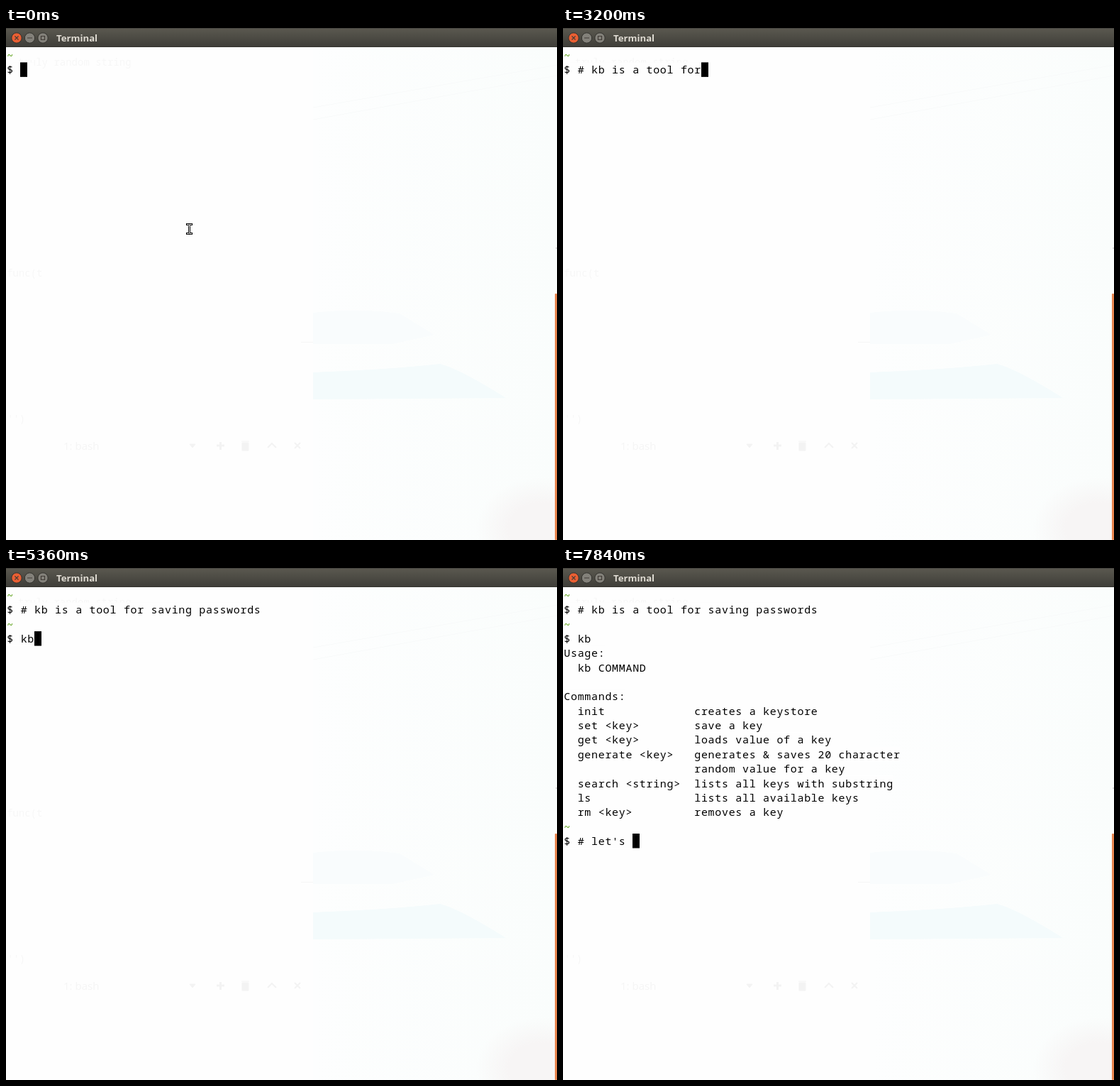
Recreate the animation shown at these times as an HTML page. Size 777 px wide and 721 px high, loop 8 s.

```html
<!DOCTYPE html>
<html lang="en">
<head>
<meta charset="utf-8">
<title>Terminal</title>
<style>
html, body { margin: 0; width: 100%; height: 100%; overflow: hidden; background: #fefefe; }
svg { display: block; width: 777px; height: 721px; }
text { white-space: pre; }
.term { font: 15px "Noto Sans Mono", "DejaVu Sans Mono", monospace; letter-spacing: .68px; }
.title { font: 700 13.2px "Open Sans", "Noto Sans", sans-serif; fill: #dfdbd2; }
.ghost { font: 14px "Noto Sans Mono", monospace; fill: #f7f7f7; }
.tab { font: 15px "Open Sans", sans-serif; fill: #f5f5f5; }
</style>
</head>
<body>
<svg viewBox="0 0 777 721">
  <defs>
    <linearGradient id="bar" x2="0" y2="1">
      <stop offset="0" stop-color="#5b5950"/>
      <stop offset="1" stop-color="#3e3d38"/>
    </linearGradient>
    <linearGradient id="sky" x2="1" y2="0">
      <stop offset="0" stop-color="#fdfefe"/>
      <stop offset="1" stop-color="#fafdfc"/>
    </linearGradient>
    <radialGradient id="rock">
      <stop offset=".5" stop-color="#f7f5f5"/>
      <stop offset="1" stop-color="#f7f5f5" stop-opacity="0"/>
    </radialGradient>
  </defs>

  <!-- faint desktop behind the window -->
  <rect width="777" height="721" fill="#fefefe"/>
  <rect x="433" y="27" width="344" height="694" fill="url(#sky)"/>
  <path d="M433 112 777 52M433 129 777 67" stroke="#f8fafa" fill="none"/>
  <path d="M433 401Q500 394 555 402L604 432 545 445H433Z" fill="#f9fcfd"/>
  <path d="M433 485 Q540 481 612 473 Q640 480 705 521 L433 523Z" fill="#f4fbfc"/>
  <ellipse cx="755" cy="705" rx="92" ry="72" fill="url(#rock)"/>
  <path d="M416 442.5H433" stroke="#f6f6f6"/>
  <rect x="774" y="374" width="3" height="347" rx="1" fill="#e8854f"/>
  <rect x="775" y="309" width="2" height="2" fill="#ddd"/>

  <text class="ghost" x="17" y="53">truly random string</text>
  <text class="ghost" x="1" y="350">func(t</text>
  <text class="ghost" x="2" y="555">'')</text>
  <text class="tab" x="81" y="594">1: bash</text>
  <g fill="#f3f3f3" stroke="#f3f3f3">
    <path d="M259 586h8l-4 5z"/>
    <path d="M297 588h11M302.500 583v11" stroke-width="3"/>
    <path d="M333 584h9v11h-9zM332 582h11"/>
    <path d="M369 591l6-6 6 6M407 584l8 8M415 584l-8 8" fill="none" stroke-width="2"/>
  </g>

  <g id="screen"></g>
  <rect id="cursor" width="10" height="20.500"/>
  <g id="pointer" fill="none" stroke-linecap="square">
    <path d="M255.500 276.500h2l1 1 1-1h2M258.500 277v12M255.500 289.500h2l1-1 1 1h2" stroke="#000" stroke-width="3"/>
    <path d="M255.500 276.500h2l1 1 1-1h2M258.500 277v12M255.500 289.500h2l1-1 1 1h2" stroke="#fff"/>
  </g>

  <!-- title bar -->
  <rect width="777" height="27" fill="url(#bar)"/>
  <path d="M0 .5H777" stroke="#45443f"/>
  <path d="M0 26.500H777" stroke="#35342f"/>
  <g stroke="#33322e">
    <circle cx="15" cy="14" r="7.200" fill="#ea5f33"/>
    <circle cx="33.500" cy="14" r="7.200" fill="#83817a"/>
    <circle cx="52" cy="14" r="7.200" fill="#83817a"/>
  </g>
  <path d="M12.500 11.500l5 5M17.500 11.500l-5 5M30 14h7M49.500 11.500h5v5h-5z" fill="none" stroke="#403b36" stroke-width="1.200"/>
  <text class="title" x="71" y="19">Terminal</text>
</svg>

<script>
const LOOP = 8000, CELL = 9.68, LEAD = 20.35, LEFT = 1, TOP = 28.05;
const intro = "# kb is a tool for saving passwords";
const lines = ["~", "$ " + intro, "~", "$ kb",
  "Usage:",
  "  kb COMMAND",
  "",
  "Commands:",
  "  init             creates a keystore",
  "  set <key>        save a key",
  "  get <key>        loads value of a key",
  "  generate <key>   generates & saves 20 character",
  "                   random value for a key",
  "  search <string>  lists all keys with substring",
  "  ls               lists all available keys",
  "  rm <key>         removes a key",
  "~", ""];

// Each step: time, prompt row, typed text, cursor shown
const steps = [];
const add = (time, row, typed, lit = true) => steps.push({ time, row, typed, lit });
const type = (start, row, list) => list.forEach((s, i) => add(start + i * 80, row, s));
const upTo = (start, counts) => type(start, 1, counts.map(n => intro.slice(0, n)));

add(0, 1, "");
add(320, 1, "", false);
type(560, 1, ["", "#"]);
add(800, 1, "# ");
type(1120, 1, ["# k", "# ke", "# keyt"]);
add(1680, 1, "# key");
type(1840, 1, ["# ke", "# k"]);
upTo(2160, [5]);
upTo(2320, [7, 8, 9, 10]);
upTo(2720, [12, 13]);
upTo(2960, [14, 15, 17, 18, 19, 21, 22, 24, 25, 27, 28]);
upTo(3920, [29, 30, 31, 32, 34, 35]);
add(4720, 1, intro, false);
add(4800, 3, "");
add(5200, 3, "", false);
type(5280, 3, ["k", "kb"]);
add(5520, 17, "");
add(5920, 17, "", false);
add(6160, 17, "#");
add(6560, 17, "#", false);
add(6640, 17, "# ");
type(6880, 17, ["# m", "# ma"]);
type(7280, 17, ["# m", "# "]);
type(7520, 17, ["# l", "# le", "# let", "# let's", "# let's "]);

const byId = id => document.getElementById(id);
const make = (tag, attrs) => {
  const el = document.createElementNS("http://www.w3.org/2000/svg", tag);
  for (const k in attrs) el.setAttribute(k, attrs[k]);
  return byId("screen").appendChild(el);
};
const rowTop = r => TOP + r * LEAD;
const rows = lines.map((line, r) => ({
  back: make("rect", { x: 0, y: rowTop(r), height: LEAD, width: 0, fill: "#fefefe" }),
  text: make("text", {
    class: "term", x: LEFT + .34, y: Math.round(rowTop(r) + 15.9),
    fill: line === "~" ? "#4e9a06" : "#000"
  })
}));
const cursor = byId("cursor"), pointer = byId("pointer");

let shown = -1;
function draw(index) {
  const now = steps[index];
  rows.forEach(({ back, text }, r) => {
    const live = r === now.row;
    const str = r > now.row ? "" : live ? "$ " + now.typed : lines[r];
    text.textContent = str;
    // cells once written stay cleared of the faint lettering
    let cols = str.length;
    if (live) for (let i = 0; i <= index; i++)
      if (steps[i].row === r) cols = Math.max(cols, steps[i].typed.length + 3);
    if (r === 1) cols = Math.max(cols, 4);
    back.setAttribute("width", cols ? LEFT + cols * CELL : 0);
  });
  cursor.setAttribute("x", Math.round(LEFT + (now.typed.length + 2) * CELL));
  cursor.setAttribute("y", rowTop(now.row));
  cursor.style.display = now.lit ? "" : "none";
  pointer.style.display = now.time < 560 ? "" : "none";
}

function tick() {
  const t = performance.now() % LOOP;
  let i = steps.length - 1;
  while (steps[i].time > t) i--;
  if (i !== shown) draw(shown = i);
  requestAnimationFrame(tick);
}
tick();
</script>
</body>
</html>
```
